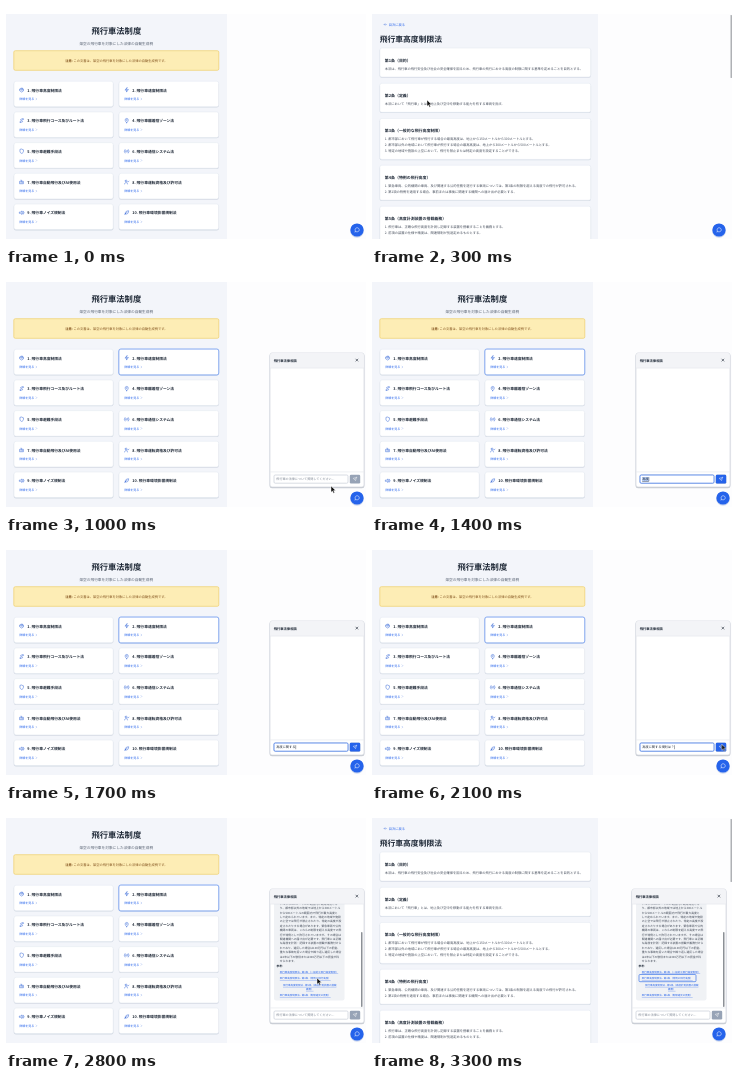
An HTML page for the animation above (3400 ms loop, 360 by 240 pixels).

```html
<!DOCTYPE html>
<html lang="ja">
<head>
<meta charset="utf-8">
<title>飛行車法制度</title>
<style>
html, body { margin: 0; width: 100%; height: 100%; overflow: hidden; background: #fff; }
svg { display: block; width: 360px; height: 240px; }
text { font-family: "Noto Sans CJK JP", "Noto Sans CJK", "Noto Sans", sans-serif; text-rendering: geometricPrecision; white-space: pre; }
.icon { fill: none; stroke: #2c5fd6; stroke-width: 2.2; stroke-linecap: round; stroke-linejoin: round; }
.icon.light { stroke: #fff; }
</style>
</head>
<body>
<svg id="stage" viewBox="0 0 360 240" xmlns="http://www.w3.org/2000/svg"></svg>
<script>
const INK = '#1f2937', BODY = '#434b59', BLUE = '#2563eb';
const LOOP = 3400;

const rect = (x, y, w, h, fill, extra = '') =>
  `<rect x="${x}" y="${y}" width="${w}" height="${h}" fill="${fill}" ${extra}/>`;

// y is the optical middle of the line
const text = (x, y, size, str, fill = INK, weight = 400, extra = '') =>
  `<text x="${x}" y="${y + size * 0.38}" font-size="${size}" fill="${fill}" font-weight="${weight}" ${extra}>${str}</text>`;

const icon = (x, y, size, d, cls = '') =>
  `<path class="icon ${cls}" d="${d}" transform="translate(${x - size / 2} ${y - size / 2}) scale(${size / 24})"/>`;

const group = (id, content, extra = '') => `<g id="${id}" ${extra}>${content}</g>`;

const card = (x, y, w, h) =>
  rect(x - 0.2, y + 0.8, w + 0.4, h, '#d3d9e3', 'rx="2"') +
  rect(x, y, w, h, '#fff', 'rx="2" stroke="#e1e6ee" stroke-width=".5"');

const backdrop = edge => rect(0, 8, edge, 225, '#f3f5fa') + rect(edge, 8, 360 - edge, 225, '#fdfdfe');
const CHEVRON = 'M9 5l7 7-7 7';

const laws = [
  ['飛行車高度制限法', 'M4 8h16v9l-8 5-8-5zM8 8V4h8v4M9 13h6'],
  ['飛行車速度制限法', 'M13 2L4 13h8l-1 9 9-12h-8z'],
  ['飛行車飛行コース及びルート法', 'M4 19h10a4 4 0 0 0 0-7H9a4 4 0 0 1 0-7h11M17 2l3 3-3 3M6 17v4'],
  ['飛行車離着陸ゾーン法', 'M12 22C7 17 5 13 5 9a7 7 0 0 1 14 0c0 4-2 8-7 13zM12 7v5'],
  ['飛行車避難手段法', 'M12 2l8 3v7c0 5-3 8-8 10-5-2-8-5-8-10V5z'],
  ['飛行車通信システム法', 'M4 4a12 12 0 0 0 0 16M20 4a12 12 0 0 1 0 16M8 8a6 6 0 0 0 0 8M16 8a6 6 0 0 1 0 8M12 11v2'],
  ['飛行車自動飛行及びAI使用法', 'M4 9h16v11H4zM12 9V4H8M9 14v2M15 14v2'],
  ['飛行車運転資格及び許可法', 'M2 21c0-9 14-9 14 0M5 7a4 4 0 0 1 8 0 4 4 0 0 1-8 0M16 11l2 2 4-5'],
  ['飛行車ノイズ規制法', 'M3 9h4l6-5v16l-6-5H3zM17 8a6 6 0 0 1 0 8M20 5a10 10 0 0 1 0 14'],
  ['飛行車環境影響規制法', 'M3 21C5 15 9 12 14 10M6 17C3 8 10 4 21 3c0 12-6 18-15 14z']
];

function lawCard([name, path], i) {
  const x = i % 2 ? 113 : 8, y = 75.2 + Math.floor(i / 2) * 30.7;
  return card(x, y, i % 2 ? 99.7 : 99.2, 25.6) +
    icon(x + 7.7, y + 8.7, 5.2, path) +
    text(x + 13.3, y + 8.9, 3.78, `${i + 1}. ${name}`, INK, 700) +
    text(x + 5.2, y + 17.8, 3, '詳細を見る', BLUE, 500) +
    icon(x + 22.4, y + 17.8, 2.8, CHEVRON);
}

const home = backdrop(221) +
  text(110.3, 25.3, 8.3, '飛行車法制度', INK, 700, 'text-anchor="middle"') +
  text(110.3, 37.3, 3.7, '架空の飛行車を対象にした法律の自動生成例', '#566070', 400, 'text-anchor="middle"') +
  rect(7.8, 44.7, 205, 19.6, '#fdedb5', 'rx="1.5" stroke="#f0cf6a" stroke-width=".7"') +
  text(110.3, 54.4, 3.26, '<tspan font-weight="700">注意:</tspan> この文書は、架空の飛行車を対象にした法律の自動生成例です。',
    '#80501c', 400, 'text-anchor="middle"') +
  laws.map(lawCard).join('') +
  group('focus', rect(112.8, 75, 100, 26, 'none', 'rx="2" stroke="#7ba3f2" stroke-width=".9"'));

const articles = [
  [42, 29, '目的', ['本法は、飛行車の飛行安全及び社会の安全確保を図るため、飛行車の飛行における高度の制限に関する基準を定めることを目的とする。']],
  [77.3, 29, '定義', ['本法において「飛行車」とは、地上及び空中を移動する能力を有する車両を指す。']],
  [112.4, 41, '一般的な飛行高度制限', [
    '1. 都市部において飛行車が飛行する場合の最高高度は、地上から150メートルから300メートルとする。',
    '2. 都市部以外の地域において飛行車が飛行する場合の最高高度は、地上から300メートルから500メートルとする。',
    '3. 特定の地域や施設の上空において、飛行を禁止または特定の高度を設定することができる。']],
  [159.2, 35, '特例の飛行高度', [
    '1. 緊急車両、公的機関の車両、及び関連する公的任務を遂行する車両については、第3条の制限を超える高度での飛行が許可される。',
    '2. 第1項の特例を適用する場合、事前または事後に関連する機関への届け出が必要とする。']],
  [200.2, 35, '高度計測装置の搭載義務', [
    '1. 飛行車は、正確な飛行高度を計測し記録する装置を搭載することを義務とする。',
    '2. 前項の装置の仕様や精度は、関連規制が別途定めるものとする。']]
];

const law = backdrop(226) +
  icon(13.3, 18.5, 3.4, 'M21 12H4M11 5l-7 7 7 7') +
  text(16.8, 18.5, 3.25, '目次に戻る', BLUE, 500) +
  text(7.7, 32.6, 7.8, '飛行車高度制限法', INK, 700) +
  articles.map(([y, h, name, lines], i) => card(7.8, y, 211, h) +
    text(12.8, y + 12.3, 3.95, `第${i + 1}条（${name}）`, INK, 700) +
    lines.map((line, n) => text(12.8, y + 20.8 + n * 6, 3.25, line, BODY)).join('')).join('') +
  rect(358.6, 9, 1.2, 63, '#9b9ea3', 'rx=".6"');

const reply = [
  'トルから300メートルの範囲内が最高高度とな',
  'り、都市部以外の地域では地上から300メートル',
  'から500メートルの範囲内で飛行が最大高度と',
  'して定められています。また、特定の地域や施設',
  'の上空では飛行が禁止されたり、特定の高度が設',
  '定されたりする場合があります。緊急車両や公的',
  '機関の車両は、これらの制限を超える高度での飛',
  '行が特例として許可されていますが、その場合は',
  '関連機関への届け出が必要です。飛行車には正確',
  'な高度を計測・記録する装置の搭載が義務付けら',
  'れており、違反した場合は100万円以下の罰金、',
  '重大な事故を招いた場合や繰り返し違反した場合',
  'は2年以下の懲役または300万円以下の罰金が科',
  'せられます。'
];

const links = [
  [161.6, '飛行車高度制限法 - 第3条（一般的な飛行高度制限）'],
  [168.2, '飛行車高度制限法 - 第4条（特例の飛行高度）'],
  [175, '飛行車高度制限法 - 第5条（高度計測装置の搭載', 277],
  [179, '義務）', 300],
  [185.5, '飛行車高度制限法 - 第6条（制限違反の罰則）']
];

const answer = rect(268, 91, 70.5, 99.5, '#f0f2f5', 'rx="2"') +
  reply.map((line, i) => text(273.8, 93.8 + i * 4.4, 2.8, line, '#3a4250')).join('') +
  text(270.5, 156.4, 2.8, '参考:', INK, 700) +
  links.map(([y, label, x = 273.8]) => text(x, y, 2.5, label, BLUE, 400, 'text-decoration="underline"')).join('') +
  rect(355, 122, 1.5, 75, '#8c9096', 'rx=".7"') +
  group('ring', rect(271, 164.5, 57, 7.2, 'none', 'rx="1" stroke="#3f78ea" stroke-width=".7"'));

const question = rect(313, 98, 39, 9, BLUE, 'rx="2"') + text(316, 102.5, 3.1, '高度に関する規則は？', '#fff');
const SEND = 'M22 2L11 13M22 2l-7 20-4-9-9-4z';
const sendButton = fill => rect(343.8, 200.7, 10.4, 8.8, fill, 'rx="1.2"') + icon(349, 205.1, 4, SEND, 'light');
const field = stroke => rect(268, 201, 74, 8.2, '#fff', `rx="1.2" stroke="${stroke}" stroke-width=".8"`);

const chat =
  rect(263.6, 79.6, 94.8, 134.6, '#c9cdd4', 'rx="2.5"') +
  rect(264, 79, 94, 134, '#fff', 'rx="2" stroke="#cdd2da" stroke-width=".6"') +
  group('question', question) +
  group('answer', answer, 'clip-path="url(#log)"') +
  rect(264.3, 79.3, 93.4, 14.7, '#f3f4f7', 'rx="1.8"') +
  rect(264.3, 93.8, 93.4, 0.5, '#dde1e7') +
  rect(264.3, 197.7, 93.4, 0.5, '#dde1e7') +
  text(267.7, 86.3, 3.3, '飛行車法律相談', INK, 700) +
  `<path d="M349.6 84.8l2.6 2.6m0-2.6l-2.6 2.6" stroke="${INK}" stroke-width=".6"/>` +
  group('idle', field('#cfd4dc') + text(270.3, 205.1, 3.1, '飛行車の法律について質問してください...', '#7d8592') + sendButton('#97a3b6')) +
  group('typing', field('#3f78ea') +
    group('marked', rect(270.2, 203, 6.6, 4.3, '#b5cdf8') + rect(270.2, 207.2, 6.6, 0.4, INK)) +
    group('entry', text(270.3, 205.1, 3.2, '高度に関する規則は？', INK), 'clip-path="url(#typed)"') +
    rect(270.3, 203.2, 0.4, 4, INK, 'id="caret"') + sendButton(BLUE));

const launcher = `<circle cx="351" cy="224.7" r="7" fill="#cfd9ee"/><circle cx="351" cy="224" r="6.6" fill="${BLUE}"/>` +
  icon(351, 224, 5.6, 'M4 20l1-4a9 9 0 1 1 3 3z', 'light');

const pointer = '<path d="M0 0v6.3l1.5-1.3 1 2.3 1.1-.5-1-2.2h2z" fill="#111" stroke="#fff" stroke-width=".45"/>';

document.getElementById('stage').innerHTML =
  `<defs><clipPath id="log">${rect(264, 94, 94, 103.5, '#000')}</clipPath>
  <clipPath id="typed">${rect(270, 201, 40, 8, '#000', 'id="reveal"')}</clipPath></defs>` +
  group('home', home) + group('law', law) +
  group('overlay', group('chat', chat) + launcher) +
  group('pointer', pointer) +
  rect(0, 233, 360, 7, '#fff');

// Stops are [time, style]; each style holds until the next stop.
function track(id, stops) {
  const frames = stops.map(([time, style]) => ({ offset: time / LOOP, easing: 'step-end', ...style }));
  frames.push({ ...frames[frames.length - 1], offset: 1 });
  document.getElementById(id).animate(frames, { duration: LOOP, iterations: Infinity });
}

// Shown during [from, to) spans
function show(id, ...spans) {
  const stops = spans[0][0] > 0 ? [[0, { visibility: 'hidden' }]] : [];
  for (const [from, to] of spans) {
    stops.push([from, { visibility: 'visible' }]);
    if (to < LOOP) stops.push([to, { visibility: 'hidden' }]);
  }
  track(id, stops);
}

const move = (x, y = 0) => ({ transform: `translate(${x}px, ${y}px)` });

show('law', [200, 500], [3000, LOOP]);
show('focus', [500, 3000]);
track('chat', [[0, { opacity: 0 }], [900, { opacity: 1 }]]);
show('question', [2200, 2600]);
track('answer', [[0, { opacity: 0 }], [2600, { opacity: 1 }]]);
show('ring', [2900, LOOP]);
track('typing', [[0, { opacity: 0 }], [1100, { opacity: 1 }], [2200, { opacity: 0 }]]);
show('marked', [1300, 1500]);
track('overlay', [[0, move(0)], [200, move(-4)], [500, move(0)], [3000, move(-4)]]);

const typed = [[0, 0], [1300, 2], [1500, 3], [1600, 5], [1700, 6], [1800, 8], [1900, 9], [2000, 10]];
track('reveal', typed.map(([time, n]) => [time, { width: `${n * 3.2 + 0.3}px` }]));
track('caret', typed.map(([time, n]) => [time, move(n * 3.2)]));

show('pointer', [100, 1200], [2000, 3100]);
track('pointer', [
  [0, move(64, 105)], [200, move(55, 94)], [400, move(24, 18)], [500, move(150, 88)],
  [600, move(321, 196)], [700, move(338, 212)], [800, move(350, 222)], [1000, move(325, 212)],
  [1100, move(300, 204)], [2000, move(340, 204)], [2100, move(349.5, 202)], [2300, move(344, 194)],
  [2500, move(330, 182)], [2700, move(311, 168)]
]);
</script>
</body>
</html>
```
